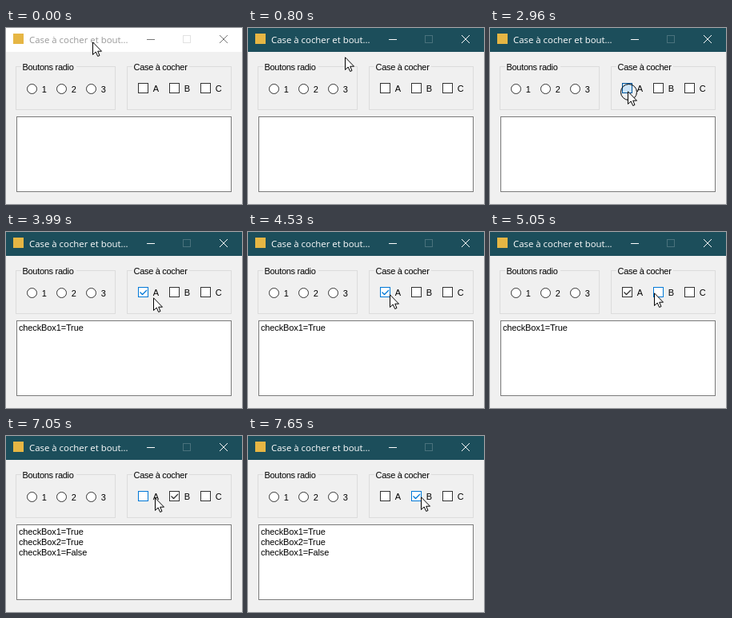
An HTML page that plays this animation: 295x221 px, repeating every 8000 ms.

```html
<!DOCTYPE html>
<html lang="fr">
<head>
<meta charset="utf-8">
<title>Case à cocher et boutons</title>
<style>
html, body { margin: 0; width: 100%; height: 100%; overflow: hidden; background: #f0f0f0; }
svg { display: block; width: 100vw; height: 100vh; }
text { font: 11px "Liberation Sans", Arial, sans-serif; fill: #000; white-space: pre; }
.label { letter-spacing: -.3px; }
.log { letter-spacing: -.13px; }
#title { font: 11.4px "Open Sans", "Noto Sans", sans-serif; }
.crisp { shape-rendering: crispEdges; }
</style>
</head>
<body>
<svg id="stage" viewBox="0 0 295 221"></svg>
<script>
const LOOP = 8000;
const stage = document.getElementById('stage');

function add(tag, attrs, text) {
  const el = document.createElementNS('http://www.w3.org/2000/svg', tag);
  set(el, attrs);
  if (text) el.textContent = text;
  stage.appendChild(el);
  return el;
}

function set(el, attrs) {
  for (const key in attrs) el.setAttribute(key, attrs[key]);
}

function frame(x, y, w, h, stroke, fill) {
  return add('rect', { x: x + .5, y: y + .5, width: w - 1, height: h - 1, stroke, fill, class: 'crisp' });
}

function group(x, w, gap, label) {
  frame(x, 48, w, 55, '#dcdcdc', 'none');
  add('rect', { x: x + 7, y: 47, width: gap, height: 3, fill: '#f0f0f0' });
  add('text', { x: x + 8.5, y: 53, class: 'label' }, label);
}

// Title bar
const bar = add('rect', { width: 295, height: 30 });
add('rect', { x: 9, y: 7, width: 13, height: 13, fill: '#e6b644' });
const title = add('text', { id: 'title', x: 29, y: 18.5 }, 'Case à cocher et bout...');
const minimize = add('path', { d: 'M176 14.5h10', class: 'crisp' });
const maximize = frame(221, 9, 10, 10, '#ddd', 'none');
const close = add('path', { d: 'M267 9l10 10m0-10l-10 10' });

// Form
group(12, 125, 69, 'Boutons radio');
group(151, 131, 71, 'Case à cocher');
[32.5, 69.5, 106.5].forEach((cx, i) => {
  add('circle', { cx, cy: 76.5, r: 6, fill: '#fff', stroke: '#333' });
  add('text', { x: cx + 12.3, y: 81 }, String(i + 1));
});
const boxes = [165, 204, 243].map((x, i) => {
  const rect = frame(x, 69, 13, 13, '#333', '#fff');
  const tick = add('path', { d: `M${x + 2.5} 75.5l3 3 5.5-5.5`, fill: 'none', 'stroke-width': 1.3 });
  add('text', { x: x + 18.7, y: 80 }, 'ABC'[i]);
  return { x, rect, tick };
});
frame(13, 111, 269, 95, '#7a7a7a', '#fff');

// Each click: pressed, released, logged, box index
const clicks = [
  [2960, 3050, 3050, 0],
  [5410, 5460, 5500, 1],
  [6430, 6520, 6560, 0]
];
const lines = ['checkBox1=True', 'checkBox2=True', 'checkBox1=False'].map((text, i) =>
  add('text', { x: 16, y: 124 + 13 * i, class: 'log' }, text));

const ring = add('circle', { r: 10, fill: 'none', stroke: '#000' });
const pointer = add('path', {
  d: 'M.5.8V16.5L4.2 13 6.7 18.5 9 17.5 6.7 12.2H11.5Z',
  fill: '#fff', stroke: '#000'
});

// Each move: start, end, steps, target x and y, optional curve control
const moves = [
  [800, 1170, 8, 163, 100],
  [1320, 1590, 5, 170, 81],
  [1840, 1840, 1, 172, 79],
  [3550, 3690, 4, 180, 113],
  [3880, 3990, 3, 184, 82],
  [4050, 4290, 4, 186, 78, 191, 79],
  [4470, 4590, 3, 176, 78],
  [4770, 5050, 5, 205, 76, 192, 85],
  [5680, 5970, 6, 173, 78, 190, 87],
  [7050, 7370, 7, 221, 74],
  [7650, 7650, 1, 216, 76]
];

function bend(a, c, b, u) {
  return Math.round(a * (1 - u) ** 2 + 2 * c * u * (1 - u) + b * u * u);
}

function pointerAt(t) {
  let x = 108, y = 17;
  for (const [from, to, steps, tx, ty, cx = (x + tx) / 2, cy = (y + ty) / 2] of moves) {
    if (t < from) break;
    const done = (t - from) / Math.max(1, to - from) * (steps - 1);
    const step = Math.min(steps, Math.floor(done + .12) + 1);
    const u = 1 - (1 - step / steps) ** 2;
    [x, y] = [bend(x, cx, tx, u), bend(y, cy, ty, u)];
  }
  return [x, y];
}

function paintBar(t) {
  const [back, ink, mark, dim] =
    t < 180 ? ['#fff', '#999', '#777', '#e2e2e2'] :
    t < 240 ? ['#8ea6ad', '#ccc', '#bbb', '#9cb1b7'] :
    ['#1c4e5b', '#fff', '#fff', '#4a727c'];
  set(bar, { fill: back });
  title.style.fill = ink;
  set(minimize, { stroke: mark });
  set(close, { stroke: mark });
  set(maximize, { stroke: dim });
}

function paintBoxes(t, x, y) {
  boxes.forEach((box, i) => {
    const own = clicks.filter(c => c[3] === i);
    const pressed = own.some(c => t >= c[0] && t < c[1]);
    const checked = own.filter(c => t >= c[1]).length % 2;
    const hover = x >= box.x && x < box.x + 28 && y > 66 && y < 84;
    const stroke = pressed ? '#005499' : hover ? '#0078d7' : '#333';
    set(box.rect, { stroke, fill: pressed ? '#cce4f7' : '#fff' });
    set(box.tick, { stroke: checked ? stroke : 'none' });
  });
}

function draw(t) {
  const [x, y] = pointerAt(t);
  paintBar(t);
  paintBoxes(t, x, y);
  lines.forEach((line, i) => set(line, { visibility: t >= clicks[i][2] ? 'visible' : 'hidden' }));
  const down = clicks.some(c => t >= c[0] && t < c[1]);
  set(ring, { cx: x + 1.5, cy: y + 1.5, visibility: down ? 'visible' : 'hidden' });
  set(pointer, { transform: `translate(${x} ${y})` });
}

const origin = performance.now();
function tick() {
  draw((performance.now() - origin) % LOOP);
  requestAnimationFrame(tick);
}
tick();
</script>
</body>
</html>
```
